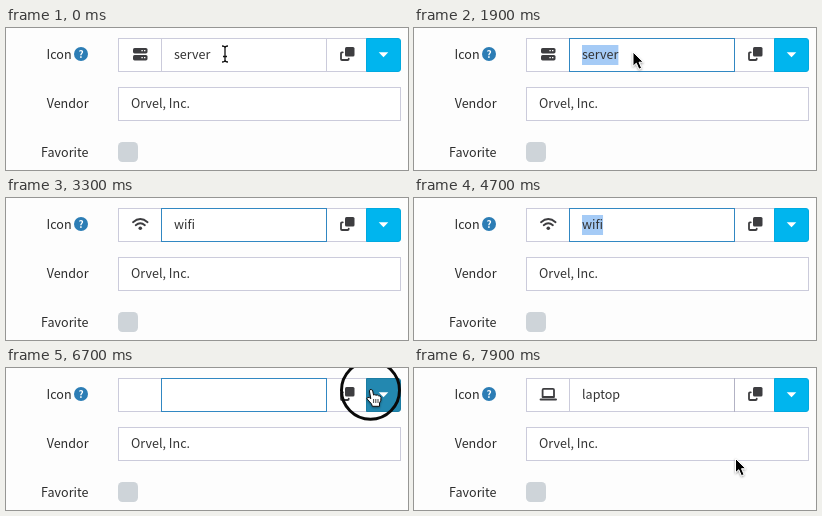
An HTML page for the animation above (8000 ms loop, 402x142 px).

```html
<!DOCTYPE html>
<html lang="en">
<head>
<meta charset="utf-8">
<title>Icon field</title>
<style>
html, body { margin: 0; width: 100%; height: 100%; overflow: hidden; background: #fdfdfd; }
svg { display: block; }
text { font: 12.55px "Noto Sans CJK JP", "Noto Sans CJK SC", "Noto Sans CJK", "Open Sans", sans-serif; fill: #333; white-space: pre; }
.label { text-anchor: end; fill: #2b2b2b; }
.box { fill: #fff; stroke: #cbcbdb; }
.dark { fill: #3d3d40; }
.line { fill: none; stroke: #3d3d40; stroke-width: 1.8; stroke-linecap: round; stroke-linejoin: round; }
</style>
</head>
<body>
<svg width="402" height="142" viewBox="0 0 402 142">
  <defs>
    <filter id="shade" x="-20%" y="-30%" width="140%" height="170%">
      <feDropShadow dx="0" dy="3" stdDeviation="6" flood-color="#000" flood-opacity=".27"/>
    </filter>
    <filter id="soft" x="-50%" y="-50%" width="200%" height="200%">
      <feDropShadow dx="0" dy="1" stdDeviation="1" flood-color="#000" flood-opacity=".4"/>
    </filter>
    <g id="laptop" class="line">
      <path d="M-5.7 2.5V-4.5Q-5.7-5.6-4.6-5.6H4.6Q5.7-5.6 5.7-4.5V2.5Z"/>
      <path d="M-7.6 5H7.6" stroke-width="2.2"/>
    </g>
  </defs>

  <text class="label" x="65.6" y="31">Icon</text>
  <circle cx="75" cy="26" r="7" fill="#2c7db5"/>
  <text x="75" y="29.7" text-anchor="middle" style="font-size:10px;font-weight:700;fill:#fff">?</text>
  <text class="label" x="82.5" y="80">Vendor</text>
  <text class="label" x="82.5" y="129">Favorite</text>

  <rect class="box" x="112.5" y="10.5" width="282" height="33"/>
  <path d="M155.5 10V44" stroke="#cbcbdb"/>
  <path id="edge" d="M320.5 10V44"/>
  <rect class="box" x="112.5" y="59.5" width="282" height="33"/>
  <text x="125" y="80">Orvel, Inc.</text>
  <rect x="112" y="114" width="20" height="20" rx="4.5" fill="#ced4d9"/>

  <g id="server" class="dark">
    <rect x="127" y="20" width="14.5" height="5.4" rx="1.6"/>
    <rect x="127" y="27" width="14.5" height="5.4" rx="1.6"/>
    <path d="M135.4 22.7h1.4m1.2 0h1.4M135.4 29.7h1.4m1.2 0h1.4" stroke="#fff" stroke-width="1.3"/>
  </g>
  <g id="wifi">
    <path class="line" d="M127 24.2Q134.3 17.8 141.6 24.2M129.7 27.2Q134.3 23.2 138.9 27.2"/>
    <circle class="dark" cx="134.3" cy="30.3" r="1.8"/>
  </g>
  <use id="chosen" href="#laptop" x="134.3" y="26.5"/>

  <rect class="dark" x="339" y="19" width="9.5" height="9.5" rx="1.5"/>
  <path class="line" d="M336.8 24.3H336Q335 24.3 335 25.3V31Q335 32 336 32H341.6Q342.7 32 342.7 31V30.6"/>

  <path d="M391 10H395V44H391Z" fill="#fdfdfd"/>
  <path id="drop" d="M360.5 10.5H392Q394.5 10.5 394.5 13V41Q394.5 43.5 392 43.5H360.5Z"/>
  <path d="M372.7 24.3H382.3L377.5 29.2Z" fill="#fff"/>

  <rect id="focus" x="155.5" y="10.5" width="165" height="33" fill="none" stroke="#3187c2"/>
  <rect id="select" x="168" y="17" height="20" fill="#a5cbf6"/>
  <text id="value" x="168" y="31"></text>
  <rect id="caret" y="17" width="1" height="20" fill="#222"/>

  <g id="menu">
    <rect x="235.5" y="46.5" width="158.5" height="81.5" rx="2" fill="#fff" filter="url(#shade)"/>
    <path d="M236 61.5H394" stroke="#e6e6ec"/>
    <rect id="hover" x="236" y="97" width="158" height="26" fill="#dddde6"/>
    <use href="#laptop" x="264.5" y="83.5" opacity=".8"/>
    <text x="286" y="88" style="fill:#6a6a6a">- laptop</text>
    <use href="#laptop" x="264.5" y="109.5"/>
    <text x="286" y="114" style="fill:#222">- laptop</text>
  </g>

  <circle id="ring" fill="none" stroke="#0a0a0a" stroke-width="3"/>
  <g id="beam" fill="none">
    <path d="M-3-8Q0-8 0-6Q0-8 3-8M0-6V6M-3 8Q0 8 0 6Q0 8 3 8M-2 2.5H2" stroke="#fff" stroke-width="3"/>
    <path d="M-3-8Q0-8 0-6Q0-8 3-8M0-6V6M-3 8Q0 8 0 6Q0 8 3 8M-2 2.5H2" stroke="#111" stroke-width="1.3"/>
  </g>
  <path id="arrow" d="M0 0V14.2L3.3 11.2L5.9 17.2L8.6 16.1L6 10.2H10.3Z" fill="#000" stroke="#fff" filter="url(#soft)"/>
  <g id="hand" fill="#fff" stroke="#111" stroke-linejoin="round" filter="url(#soft)">
    <path d="M-1.6 1.3Q-1.3-.3 .2 0Q1.4 .2 1.7 1.6L2.6 5.6Q3.8 4.6 5 5.7Q6.5 4.9 7.6 6.3Q9.8 5.8 10 8.2Q10.2 11.8 8.5 13.4V16.8H1.4Q.8 14-1.3 12.3L-4-9.3Q-4 7.2-1.6 8.1L-.2 9.2Z"/>
    <path d="M2.6 9.5V13.5M4.8 9.5V13.5M7 9.5V13.5" stroke-width=".8"/>
  </g>
</svg>
<script>
const LOOP = 8000, STEP = 100;
const HAND = 'M-1.6 1.3Q-1.3-.3 .2 0Q1.4 .2 1.7 1.6L2.6 5.6Q3.8 4.6 5 5.7Q6.5 4.9 7.6 6.3Q9.8 5.8 10 8.2Q10.2 11.8 8.5 13.4V16.8H1.4Q.8 14-1.3 12.3L-4 9.3Q-4 7.2-1.6 8.1L-.2 9.2Z';
const $ = id => document.getElementById(id);
const set = (id, attrs) => { for (const k in attrs) $(id).setAttribute(k, attrs[k]); };
const show = (id, on) => set(id, { opacity: +on });
const within = (t, ...spans) => spans.some(([a, b]) => t >= a && t < b);
const ramp = (t, a, b) => Math.min(1, Math.max(0, (t - a) / (b - a)));
const last = (keys, t) => keys.filter(k => k[0] <= t).pop();
$('hand').firstElementChild.setAttribute('d', HAND);

const typed = [[0, 'server'], [2400, 'w'], [2500, 'wi'], [2700, 'wif'], [2800, 'wifi'], [4800, ''], [7700, 'laptop']];
const pointers = [[0, 'beam'], [700, 'arrow'], [2400, ''], [6200, 'arrow'], [6500, 'hand'], [7700, 'arrow']];
const path = [[0, 219, 26], [900, 219, 26], [1100, 219, 24], [6100, 219, 24], [6500, 365, 21.5],
  [7000, 365, 21.5], [7200, 331, 98], [7600, 331, 98], [7900, 321.5, 90.5]];

function place(t) {
  const i = path.findIndex(p => p[0] > t);
  if (i < 0) return path[path.length - 1].slice(1);
  const [a, b] = [path[i - 1], path[i]];
  const k = ramp(t, a[0], b[0]), e = k * k * (3 - 2 * k);
  return [1, 2].map(n => a[n] + (b[n] - a[n]) * e);
}

function draw(t) {
  const value = last(typed, t)[1];
  $('value').textContent = value;
  const width = value ? $('value').getComputedTextLength() : 0;

  show('server', t < 2400);
  show('wifi', within(t, [2900, 4900]));
  show('chosen', t >= 7700);
  set('focus', { opacity: ramp(t, 200, 500) * (1 - ramp(t, 6800, 7000)) });
  set('select', { width });
  show('select', within(t, [400, 2400], [4700, 4800]));
  set('caret', { x: 168.3 + width });
  show('caret', within(t, [2400, 3300], [3800, 4300], [4800, 5300], [5800, 6300]));

  const pressed = within(t, [6500, 7700]);
  set('edge', { stroke: t >= 7000 ? '#b2b2c4' : '#cbcbdb' });
  set('drop', { fill: pressed ? '#2388b0' : '#00b5ee', stroke: pressed ? '#1b7ca3' : '#00a9e0' });
  set('menu', { opacity: t < 7700 ? ramp(t, 6700, 7000) : 0 });
  show('hover', t >= 7200);

  const [x, y] = place(t), pointer = last(pointers, t)[1];
  for (const id of ['beam', 'arrow', 'hand']) {
    show(id, id === pointer);
    set(id, { transform: `translate(${x} ${y})` });
  }
  const late = t > 6000;
  set('ring', { cx: late ? 364.5 : 219, cy: late ? 22.3 : 26, r: late ? 15 + 14 * ramp(t, 6600, 6700) : 15 });
  show('ring', within(t, [300, 400], [6600, 6800]));
}

const start = performance.now();
function tick() {
  const t = (performance.now() - start) % LOOP;
  draw(Math.floor(t / STEP) * STEP);
  requestAnimationFrame(tick);
}
tick();
</script>
</body>
</html>
```
